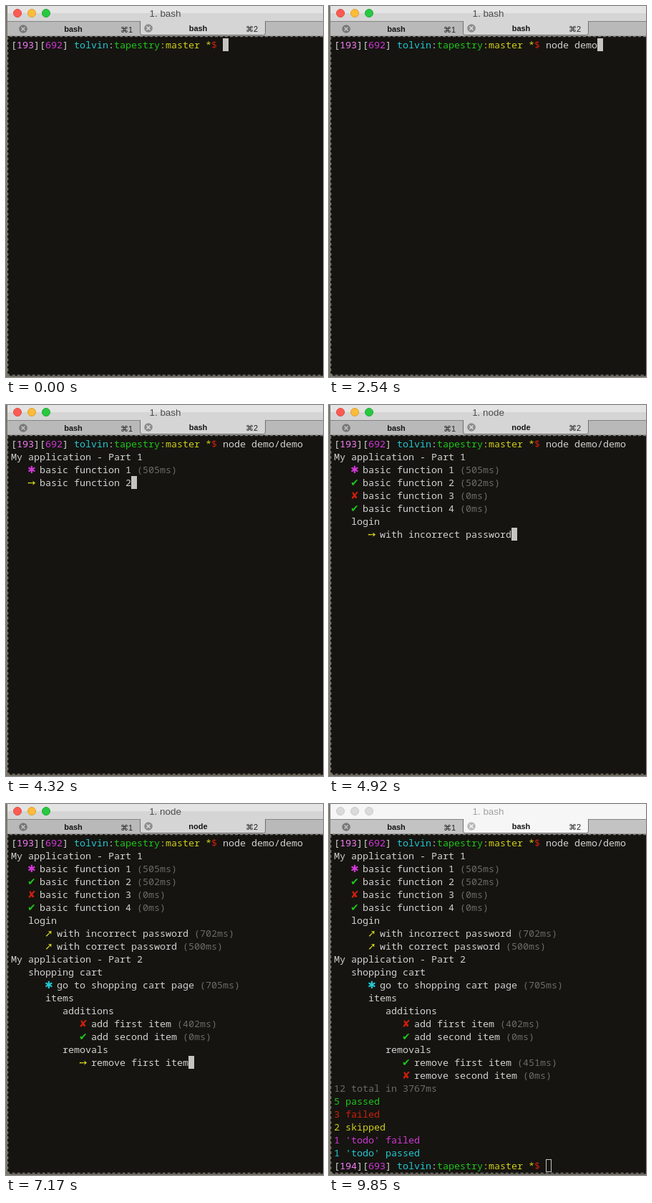
An HTML page with a canvas that plays this animation: 443 by 517 pixels, repeating every 9.92 s.

```html
<!DOCTYPE html>
<html lang="en">
<head>
<meta charset="utf-8">
<title>Terminal test run</title>
<style>
html, body { margin: 0; width: 100%; height: 100%; overflow: hidden; background: #151410; }
canvas { display: block; width: 100vw; height: 100vh; }
</style>
</head>
<body>
<canvas id="stage" width="443" height="517"></canvas>
<script>
const ctx = document.getElementById('stage').getContext('2d');
const LOOP = 9920, BLUR_AT = 9850;
const CELL = 8, LINE = 18, LEFT = 7, TOP = 45;
const MONO = '13.333px "Noto Sans Mono", "DejaVu Sans Mono", monospace';
const SYMBOLS = '14px "DejaVu Sans", sans-serif';
const SANS = '"Liberation Sans", sans-serif';

const color = {
  text: '#d2d2d0', gray: '#6b6a67', green: '#1fc41b', red: '#cf1f0c',
  yellow: '#d0cf1c', magenta: '#d337d8', pink: '#f77cf7', cyan: '#22c8d2'
};
const marks = {
  pass: ['✔', 'green'], fail: ['✘', 'red'], skip: ['➚', 'yellow'],
  todoFail: ['✱', 'magenta'], todoPass: ['✱', 'cyan'], running: ['➙', 'yellow']
};

const COMMAND = 'node demo/demo';
const keyTimes = [890, 1190, 1340, 1640, 1790, 1940, 2240, 2390, 2540, 2830, 2980, 3280, 3430, 3580];

// Each row has a start time and a list of [text, color] spans at a given time.
const plain = (start, indent, text, tint = 'text') =>
  ({ start, indent, spans: () => [[text, tint]] });

const test = (start, end, indent, mark, name, ms) => ({
  start, indent: indent + 2,
  mark: t => marks[t < end ? 'running' : mark],
  spans: t => t < end ? [[name, 'text']] : [[name, 'text'], [` (${ms}ms)`, 'gray']]
});

const prompt = (start, first, second, typed) => ({
  start, indent: 0,
  spans: t => [
    ['[', 'text'], [first, 'pink'], ['][', 'text'], [second, 'magenta'], ['] ', 'text'],
    ['tolvin', 'cyan'], [':', 'text'], ['tapestry', 'green'], [':master *', 'yellow'],
    ['$ ', 'red'], [typed(t), 'text']
  ]
});

const rows = [
  prompt(0, '193', '692', t => COMMAND.slice(0, keyTimes.filter(k => k <= t).length)),
  plain(3880, 0, 'My application - Part 1'),
  test(3880, 4320, 3, 'todoFail', 'basic function 1', 505),
  test(4320, 4920, 3, 'pass', 'basic function 2', 502),
  test(4920, 4920, 3, 'fail', 'basic function 3', 0),
  test(4920, 4920, 3, 'pass', 'basic function 4', 0),
  plain(4920, 3, 'login'),
  test(4920, 5520, 6, 'skip', 'with incorrect password', 702),
  test(5520, 6120, 6, 'skip', 'with correct password', 500),
  plain(6120, 0, 'My application - Part 2'),
  plain(6120, 3, 'shopping cart'),
  test(6120, 6870, 6, 'todoPass', 'go to shopping cart page', 705),
  plain(6870, 6, 'items'),
  plain(6870, 9, 'additions'),
  test(6870, 7170, 12, 'fail', 'add first item', 402),
  test(7170, 7170, 12, 'pass', 'add second item', 0),
  plain(7170, 9, 'removals'),
  test(7170, 7620, 12, 'pass', 'remove first item', 451),
  test(7620, 7620, 12, 'fail', 'remove second item', 0),
  plain(7620, 0, '12 total in 3767ms', 'gray'),
  plain(7620, 0, '5 passed', 'green'),
  plain(7620, 0, '3 failed', 'red'),
  plain(7620, 0, '2 skipped', 'yellow'),
  plain(7620, 0, "1 'todo' failed", 'magenta'),
  plain(7620, 0, "1 'todo' passed", 'cyan'),
  prompt(7620, '194', '693', () => '')
];

function box(x, y, w, h, fill) {
  ctx.fillStyle = fill;
  ctx.fillRect(x, y, w, h);
}

function label(text, x, y, font, fill, align = 'left') {
  ctx.font = font;
  ctx.fillStyle = fill;
  ctx.textAlign = align;
  ctx.fillText(text, x, y);
}

function disc(x, y, r, fill, stroke) {
  ctx.beginPath();
  ctx.arc(x, y, r, 0, Math.PI * 2);
  ctx.fillStyle = fill;
  ctx.fill();
  if (!stroke) return;
  ctx.strokeStyle = stroke;
  ctx.lineWidth = 1;
  ctx.stroke();
}

function closeButton(x, y, fill, cross) {
  disc(x, y, 5.8, fill);
  ctx.strokeStyle = cross;
  ctx.lineWidth = 1.5;
  ctx.beginPath();
  ctx.moveTo(x - 2.5, y - 2.5);
  ctx.lineTo(x + 2.5, y + 2.5);
  ctx.moveTo(x + 2.5, y - 2.5);
  ctx.lineTo(x - 2.5, y + 2.5);
  ctx.stroke();
}

function drawWindow(t, focused) {
  const isNode = end => t >= 4920 && t < end;
  const bar = focused ? '#d5d5d5' : '#f6f6f6';

  box(0, 0, 443, 517, '#7d786b');
  ctx.beginPath();
  ctx.roundRect(2, 0, 460, 515.5, [0, 0, 0, 5]);
  ctx.fillStyle = '#151410';
  ctx.fill();

  box(2, 0, 441, 21, bar);
  if (focused) box(2, 0, 441, 10, '#e4e4e4');
  const lights = focused
    ? [['#fc5b53', '#df4941'], ['#fdbc38', '#dea033'], ['#28c941', '#1fa935']]
    : Array(3).fill(['#dadada', '#c9c9c9']);
  lights.forEach(([fill, stroke], i) => disc(16 + 20 * i, 10, 5.5, fill, stroke));
  label(isNode(8670) ? '1. node' : '1. bash', 222.5, 15, '13.4px ' + SANS,
    focused ? '#4b4b4b' : '#a2a2a2', 'center');

  box(2, 21, 441, 21, focused ? '#b9b9ba' : '#c3c3c3');
  box(2, 21, 441, 1, '#858585');
  box(2, 41, 441, 1, '#a2a2a2');
  ctx.beginPath();
  ctx.roundRect(187.5, 19.5, 175, 21, [0, 0, 3, 3]);
  ctx.fillStyle = bar;
  ctx.fill();
  ctx.strokeStyle = '#6f6f6f';
  ctx.lineWidth = 1;
  ctx.stroke();
  box(187, 18, 176, 3, bar);

  closeButton(24, 32, '#777', '#c4c4c4');
  closeButton(199, 31, focused ? '#8c8c8c' : '#b8b8b8', focused ? '#dedede' : '#f4f4f4');
  const bold = 'bold 11px ' + SANS, key = '11px "Liberation Sans", "DejaVu Sans", sans-serif';
  label('bash', 94, 36, bold, '#161616', 'center');
  label(isNode(8810) ? 'node' : 'bash', 268.5, 35, bold, '#161616', 'center');
  label('⌘1', 177, 37, key, '#222', 'right');
  label('⌘2', 352, 36, key, '#222', 'right');

  ctx.setLineDash([4, 3]);
  ctx.strokeStyle = '#77756f';
  ctx.beginPath();
  ctx.moveTo(443, 42.5);
  ctx.lineTo(2.5, 42.5);
  ctx.lineTo(2.5, 511);
  ctx.quadraticCurveTo(2.5, 514.5, 7, 514.5);
  ctx.lineTo(443, 514.5);
  ctx.stroke();
  ctx.setLineDash([]);
}

function drawRows(t, focused) {
  let cursorX = LEFT, cursorY = TOP;
  rows.forEach((row, i) => {
    if (t < row.start) return;
    const y = TOP + LINE * i;
    let x = LEFT + CELL * row.indent;
    if (row.mark) {
      const [symbol, tint] = row.mark(t);
      label(symbol, x - 2 * CELL - 1, y + 14, SYMBOLS, color[tint]);
    }
    for (const [text, tint] of row.spans(t)) {
      label(text, x, y + 14, MONO, color[tint]);
      x += CELL * text.length;
    }
    cursorX = x;
    cursorY = y;
  });
  if (focused) {
    box(cursorX, cursorY, CELL, LINE, '#c6c4c1');
  } else {
    ctx.strokeStyle = '#c6c4c1';
    ctx.lineWidth = 1;
    ctx.strokeRect(cursorX + 0.5, cursorY + 0.5, CELL - 1, LINE - 1);
  }
}

function draw(now) {
  const t = now % LOOP;
  const focused = t < BLUR_AT;
  drawWindow(t, focused);
  drawRows(t, focused);
}

let origin;
function tick(now) {
  origin ??= now;
  draw(now - origin);
  requestAnimationFrame(tick);
}
draw(0);
requestAnimationFrame(tick);
</script>
</body>
</html>
```
